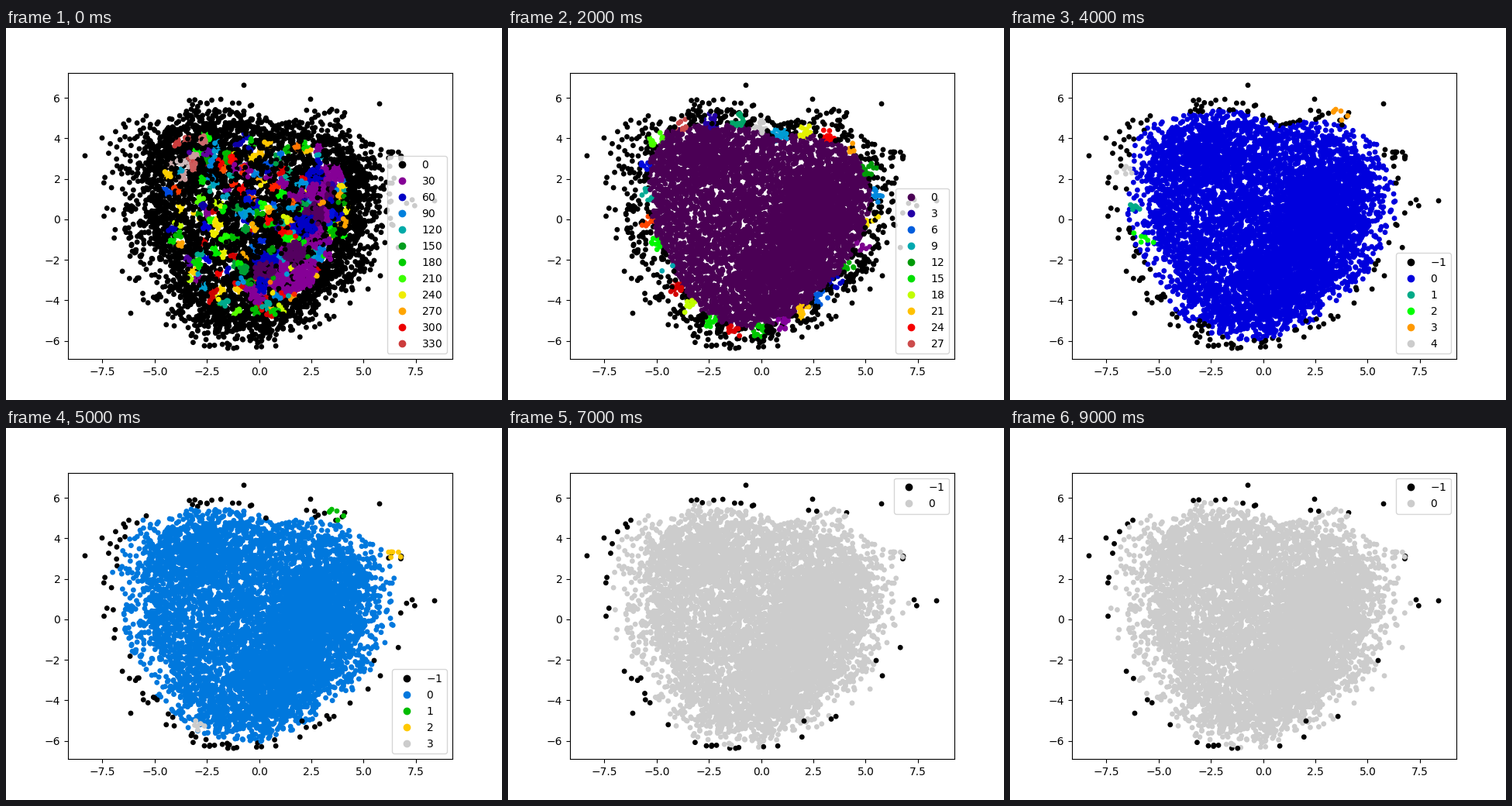
A matplotlib script for the animation above (10 s loop, 640 by 480 pixels).

```python
import numpy as np
import matplotlib.pyplot as plt
from matplotlib.animation import FuncAnimation
from matplotlib.lines import Line2D

rng = np.random.default_rng(12)
CMAP = plt.get_cmap("nipy_spectral")
CENTER = np.array([325, 250])

# Highest cluster label and legend entries at each step of the growing radius
TOPS = [343, 110, 28, 7, 4, 3, 0, 0, 1, 0]
ENTRIES = [range(0, 331, 30), range(0, 106, 15), range(0, 28, 3)]
ENTRIES += [range(-1, top + 1) for top in TOPS[3:]]

# Key points on the edge of the dense core, in stage pixels
EDGE = np.array([
    (183, 170), (205, 134), (255, 126), (300, 124), (345, 143), (405, 140),
    (452, 168), (468, 225), (445, 287), (405, 335), (320, 387), (255, 371),
    (210, 300), (184, 215)])
FAR = [(553, 223), (102, 165), (307, 74), (256, 410), (382, 378), (161, 368),
       (475, 300), (393, 92), (124, 142), (482, 98)]

# Small outer clusters: centre and the label at the steps where they show
LOCAL = [((420, 109), {4: 3, 5: 1}), ((501, 162), {5: 2}),
         ((247, 387), {5: 3}), ((161, 229), {4: 1}), ((171, 273), {4: 2}),
         ((148, 181), {4: 4}), ((174, 325), {8: 1})]

# Points this far outside the core stay noise through the paired step
NOISE = [(-0.5, 1), (0, 2), (0.45, 3), (0.8, 4), (0.98, 5), (1.16, 6),
         (1.27, 8), (1.32, 9)]


def polar(pts):
    d = pts - CENTER
    return np.arctan2(d[:, 1], d[:, 0]), np.hypot(d[:, 0], d[:, 1])


def core_radius(angle):
    return np.interp(angle, *polar(EDGE), period=2 * np.pi)


def fringe(angle):
    return 20 + 22 * np.cos(angle) ** 2


def excess(pts):
    """Distance outside the core edge, in fringe widths."""
    angle, r = polar(pts)
    return (r - core_radius(angle)) / fringe(angle)


def ring(count, level):
    angle = rng.uniform(-np.pi, np.pi, count)
    r = core_radius(angle) + level * fringe(angle)
    return CENTER + np.column_stack([r * np.cos(angle), r * np.sin(angle)])


def ridge(t):
    return np.column_stack([402 - 85 * t ** 2, 195 + 155 * t])


def make_bulk():
    even = rng.uniform((170, 115), (480, 395), (6500, 2))
    dense = ridge(rng.uniform(0, 1, 1800)) + rng.normal(0, 26, (1800, 2))
    shoulder = rng.normal((250, 160), (42, 18), (450, 2))
    core = np.vstack([even, dense, shoulder])
    halo = ring(750, 0.85 * rng.uniform(0, 1, 750) ** 1.5)
    return rng.permutation(np.vstack([core[excess(core) < 0], halo]))


bulk = make_bulk()
outliers = np.vstack([ring(130, rng.uniform(0.8, 1.5, 130)), FAR])
local = [np.array(c) + rng.normal(0, (6, 4), (2 if 8 in names else 6, 2))
         for c, names in LOCAL]
points = np.vstack([bulk, outliers] + local)
level = excess(points)

last_noise = np.zeros(len(points), int)
for limit, step in NOISE:
    last_noise[level > limit] = step
owner = np.full(len(points), -1)
owner[len(bulk) + len(outliers):] = np.repeat(
    np.arange(len(local)), [len(c) for c in local])
for i, (_, names) in enumerate(LOCAL):
    last_noise[owner == i] = min(names) - 1
last_noise[len(bulk) + len(outliers) - len(FAR):][:len(FAR)] = 9

# Seeds of the clusters: mixed over the core, low labels on the ridge,
# the highest ones at the upper left
inner = bulk[excess(bulk) < -0.5]
mixed = np.column_stack([inner[:320], np.full(320, 6),
                         20 + 305 * rng.uniform(0, 1, 320) ** 1.15])
pale = inner[(inner[:, 0] < 260) & (inner[:, 1] < 200)][:10]
pale = np.column_stack([pale, np.full(10, 6), rng.uniform(330, 343, 10)])
along = np.column_stack([ridge(np.linspace(0, 1, 22)) + rng.normal(0, 13, (22, 2)),
                         rng.uniform(9, 16, 22),
                         np.resize([30, 60, 30, 12, 30], 22)])
PATCHES = np.vstack([mixed, pale, along])


def rim_patches(count, radius, level):
    """One patch per label at shuffled, evenly spread places on the edge."""
    angle = 2 * np.pi * rng.permutation(count) / count - np.pi
    r = core_radius(angle) + level * fringe(angle)
    xy = CENTER + np.column_stack([r * np.cos(angle), r * np.sin(angle)])
    return np.column_stack([xy, np.full(count, radius), 1 + np.arange(count)])


chance = rng.uniform(0, 1, len(points))
# Patches and the innermost level they may colour
MIXES = {0: (PATCHES, -9), 1: (rim_patches(110, 8, -0.2), -0.6),
         2: (rim_patches(28, 10, 0.2), -0.2), 3: (rim_patches(7, 12, 0.8), 0.4)}


def cluster(step):
    labels = np.where(last_noise >= step, -1.0, 0.0)
    patches, floor = MIXES.get(step, ([], 0))
    for x, y, radius, label in patches:
        near = np.hypot(points[:, 0] - x, points[:, 1] - y) < radius
        labels[near & (level > floor) & (chance < 0.88)] = label
    for i, (_, names) in enumerate(LOCAL):
        if step in names:
            labels[owner == i] = names[step]
    return labels


def shade(labels, step):
    return CMAP((np.asarray(labels, float) + 1) / (TOPS[step] + 1))


STEPS = [shade(cluster(k), k) for k in range(len(TOPS))]

fig, ax = plt.subplots(figsize=(6.4, 4.8), dpi=100)
scat = ax.scatter((points[:, 0] - 326.65) / 26.95, (247 - points[:, 1]) / 26.1,
                  s=15)
ax.set_xlim(-9.15, 9.25)
ax.set_ylim(-6.90, 7.25)


def update(step):
    scat.set_color(STEPS[step])
    handles = [Line2D([], [], ls="", marker="o", ms=6, mew=1,
                      color=shade(v, step), label=rf"$\mathdefault{{{v}}}$")
               for v in ENTRIES[step]]
    corner = "upper right" if TOPS[step] < 2 else "lower right"
    ax.legend(handles=handles, loc=corner)
    return [scat]


anim = FuncAnimation(fig, update, frames=len(TOPS), interval=1000,
                     repeat=True, repeat_delay=0, blit=False)
plt.show()
```
